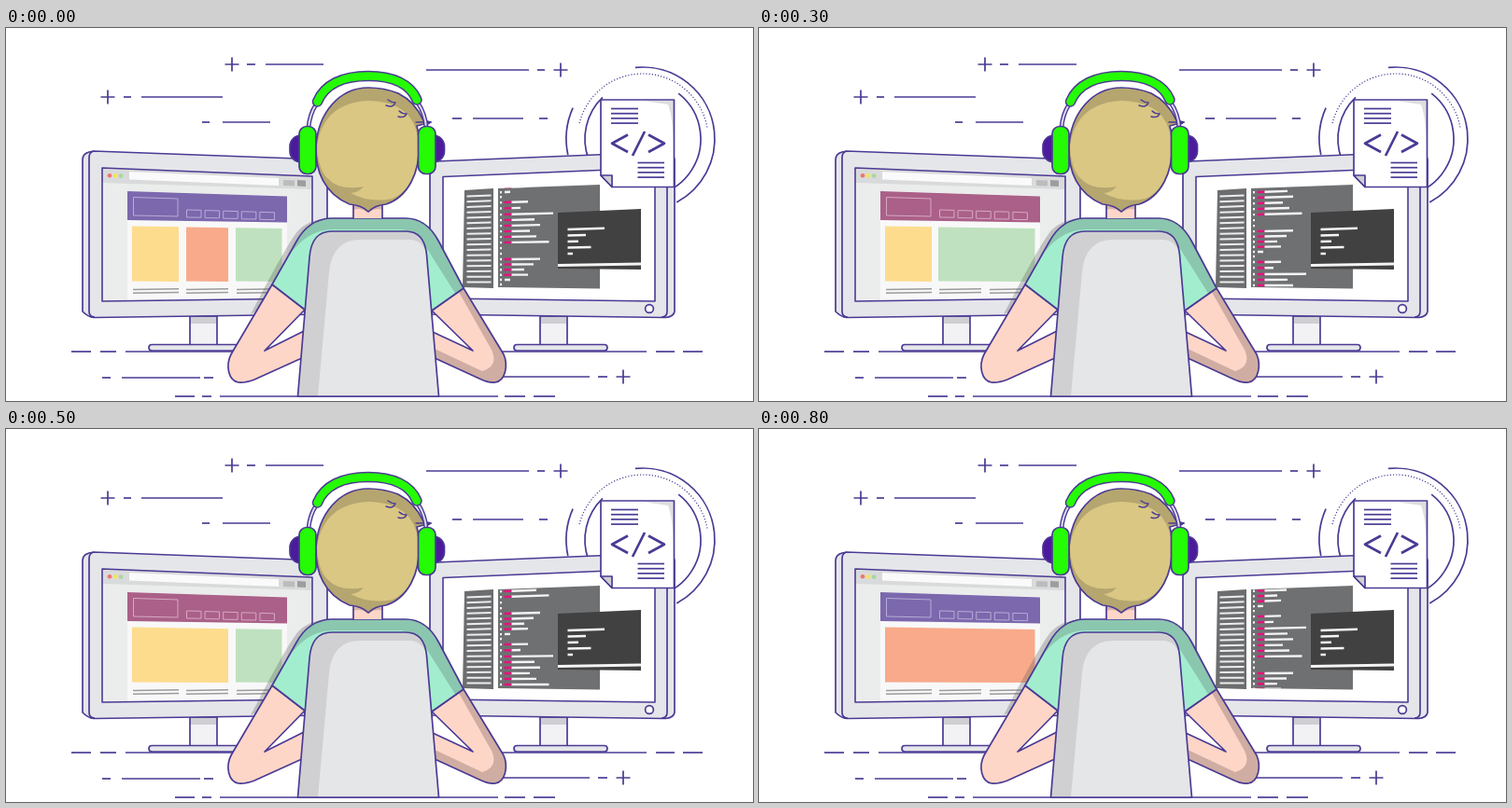
An HTML page with a canvas for the animation above (0.9 s loop, 800 by 400 pixels).

```html
<!DOCTYPE html>
<html lang="en">
<head>
<meta charset="utf-8">
<title>Developer at work</title>
<style>
html, body { margin: 0; width: 100%; height: 100%; overflow: hidden; background: #fff; }
canvas { display: block; width: 800px; height: 400px; }
</style>
</head>
<body>
<canvas id="stage"></canvas>
<script>
const canvas = document.getElementById('stage');
const ctx = canvas.getContext('2d');
const ratio = window.devicePixelRatio || 1;
canvas.width = 800 * ratio;
canvas.height = 400 * ratio;

const INK = '#4b3a94', CASE = '#e5e6ea', SHADE = '#d0d0d2', SKIN = '#fdd6c8';
const GREEN = '#25fb04', YELLOW = '#fddc8e', ORANGE = '#f8aa8a', MINT = '#bfe1bf';
const STEP = 100, STEPS = 9;

function path(d, fill, stroke, width = 1.7) {
  const p = new Path2D(d);
  if (fill) { ctx.fillStyle = fill; ctx.fill(p); }
  if (stroke) { ctx.strokeStyle = stroke; ctx.lineWidth = width; ctx.stroke(p); }
}

function quad(x1, y1, x2, y2, x3, y3, x4, y4, fill, stroke, width) {
  path(`M${x1} ${y1}L${x2} ${y2}L${x3} ${y3}L${x4} ${y4}Z`, fill, stroke, width);
}

function rounded(x, y, w, h, r, fill, stroke) {
  ctx.beginPath();
  ctx.roundRect(x, y, w, h, r);
  ctx.fillStyle = fill;
  ctx.fill();
  if (stroke) { ctx.strokeStyle = stroke; ctx.lineWidth = 1.7; ctx.stroke(); }
}

function disc(x, y, r, fill, stroke) {
  rounded(x - r, y - r, 2 * r, 2 * r, r, fill, stroke);
}

function dashes(y, ...xs) {
  for (let i = 0; i < xs.length; i += 2) path(`M${xs[i]} ${y}H${xs[i + 1]}`, null, INK);
}

function plus(x, y) {
  path(`M${x - 7.5} ${y}h15M${x} ${y - 7.5}v15`, null, INK);
}

function arc(r, from, to, dots) {
  const rad = Math.PI / 180;
  ctx.beginPath();
  ctx.arc(682, 119, r, from * rad, to * rad);
  ctx.strokeStyle = INK;
  ctx.lineWidth = dots ? 1.2 : 1.7;
  ctx.setLineDash(dots ? [1.2, 2] : []);
  ctx.stroke();
  ctx.setLineDash([]);
}

function backdrop() {
  plus(242, 39);
  dashes(39, 258, 267, 278, 340);
  plus(109, 74);
  dashes(74, 126, 134, 145, 232);
  dashes(101, 210, 218, 232, 283);
  dashes(45, 450, 560, 569, 577);
  plus(594, 45);
  dashes(97, 478, 488, 500, 554, 571, 580);
  dashes(347, 70, 91, 101, 118, 128, 262, 512, 686, 696, 716, 725, 746);
  dashes(375, 103, 112, 124, 208, 212, 222);
  dashes(374, 532, 625, 634, 644);
  plus(661, 374);
  dashes(395, 181, 202, 210, 220, 229, 527, 534, 556, 565, 588);
  arc(77, -96, 62);
  arc(82, 168, 204);
  arc(70, 194, 350, true);
  arc(62, 160, 226);
  arc(62, -52, 58);
}

function stand(x) {
  path(`M${x - 14} 309V341H${x + 15}V309Z`, '#f2f2f5', INK);
  quad(x - 13, 310, x + 14, 310, x + 14, 317, x - 13, 317, '#cfcfd3');
}

function stands() {
  stand(211);
  rounded(153, 339.5, 104, 6.5, 3.2, CASE, INK);
  stand(586);
  rounded(544, 339.5, 100, 6.5, 3.2, CASE, INK);
}

function monitors() {
  path('M82 141Q82 135 89 133L94 132L339 141Q344 142 344 147V307L94 310.500Q88 310 82 304Z', CASE, INK);
  path('M94 132Q89 133 89 139V304Q89 310 95 310', null, INK);
  path('M454 148Q454 143 460 143L704 133Q716 135 716 141V304Q715 310 706 310.500L454 307Z', CASE, INK);
  path('M703 133Q708 134 708 140V304Q708 310 702 310', null, INK);
  quad(103, 150, 328, 159, 328, 290, 103, 293, '#ebecec');
  quad(468, 159.500, 695, 150, 695, 293, 468, 290, '#fff', INK, 1.6);
  disc(689, 301, 4.4, '#fff', INK);
}

function layoutCards(step) {
  if (step < 3) return [[135, 185, YELLOW], [193, 238, ORANGE], [246, 295.5, MINT]];
  if (step < 5) return [[135, 185, YELLOW], [192, 295.5, MINT]];
  if (step < 7) return [[135, 238, YELLOW], [246, 295.5, MINT]];
  return [[135, 295.5, ORANGE]];
}

function browser(step) {
  quad(103, 150, 328, 159, 328, 173, 103, 166, '#d9dadb');
  ['#ea7670', '#f7e35c', '#a8d89a'].forEach((c, i) => disc(111 + i * 6, 158.2 + i * 0.2, 2.3, c));
  quad(132, 154, 292, 161, 292, 169, 132, 162.500, '#fafafa');
  quad(297, 163, 309, 163.500, 309, 169.500, 297, 169, '#bcbcbd');
  quad(312, 163, 321, 163.500, 321, 170, 312, 169.500, '#9d9d9f');
  quad(130, 175, 301, 180, 301, 290, 130, 292, '#f8f8f8');
  const mauve = step > 2 && step < 7;
  quad(130, 175, 301, 180.500, 301, 208.500, 130, 206, mauve ? '#aa6088' : '#7b68ad');
  const trim = mauve ? '#d8a9c4' : '#b9acd9';
  quad(136.500, 181.500, 184, 183, 184, 202, 136.500, 201, null, trim, 1);
  for (let i = 0; i < 5; i++) {
    const x = 193.5 + i * 19.6, y = 195 + i * 0.6;
    quad(x, y, x + 15.5, y + 0.4, x + 15.5, y + 8.2, x, y + 8, null, trim, 1);
  }
  for (const [a, b, color] of layoutCards(step)) {
    const top = x => 212.5 + (x - 135) * 0.016;
    quad(a, top(a), b, top(b), b, 272, a, 271.500, color);
  }
  for (const [a, b] of [[136, 185], [193, 238], [247, 295]]) {
    path(`M${a} 280.500L${b} 279.800M${a} 284.200L${b} 283.500`, null, '#9b9b9b', 1.6);
  }
  quad(103, 150, 328, 159, 328, 290, 103, 293, null, INK, 1.6);
}

// Offset within the repeating listing, right end of the text
const LISTING = [
  [0, 572], [5.6, 565], [11.2, 555], [16.7, 559], [22, 540], [27, 0],
  [33, 559], [39.3, 551], [46, 586], [52, 566], [58, 572],
  [64, 561], [70, 568], [76, 581.5], [82, 0], [88, 0]
];

function codeRow(y, end) {
  const tilt = -0.037 * (278 - y) / 106;
  const bar = (a, b, color) =>
    path(`M${a} ${y + (a - 535) * tilt}L${b} ${y + (b - 535) * tilt}`, null, color, 2.4);
  bar(529, 531, '#f4f4f4');
  if (!end) return;
  if (end < 545) return bar(534, end, '#f4f4f4');
  bar(533.5, 541.5, '#e5127d');
  bar(541.5, end, '#f4f4f4');
}

function editor(step) {
  quad(491, 174, 522, 172, 522, 279, 489, 278, '#6c6d6f');
  for (let i = 0; i < 17; i++) {
    const y = 180.5 + i * 5.75;
    path(`M493.500 ${y}L519.500 ${y - 1 + i * 0.06}`, null, '#ededed', 2);
  }
  const panel = 'M527 172L636 168V279.500L527 278Z';
  path(panel, '#6f7072');
  ctx.save();
  ctx.clip(new Path2D(panel));
  const base = 248 - step * 10;
  for (let turn = -1; turn < 3; turn++) {
    for (const [dy, end] of LISTING) {
      const y = base + turn * 94 + dy;
      if (y > 168 && y < 282) codeRow(y, end);
    }
  }
  ctx.restore();
}

function consoleRows(step) {
  if (step === 1 || step === 2) return [641, 614, 622, 605, 607];
  if (step === 6 || step === 7) return [614, 632, 605, 626.5, 607];
  return [641, 621, 613, 626.5, 607];
}

function terminal(step) {
  quad(591, 198, 680, 194, 680, 259, 591, 258, '#414142');
  quad(591, 253, 680, 251.500, 680, 254.500, 591, 256, '#f3f3f3');
  consoleRows(step).forEach((end, i) => {
    const y = 216 + i * 6.5;
    path(`M601.500 ${y}L${end} ${y - (end - 601) * (0.034 - i * 0.006)}`, null, '#f4f4f4', 2.5);
  });
}

function paper() {
  path('M637 77H715.500V170.500H649L637 158Z', '#fff');
  path('M682 78H715V124Q714 95 709 82Z', '#dedee0');
  path('M637 77H715.500V170.500H649L637 158Z', null, INK);
  path('M637 158H649V170.500Z', SHADE, INK);
  for (let i = 0; i < 4; i++) {
    dashes(86.5 + i * 5.2, 648, 677);
    dashes(144.5 + i * 5.2, 676.5, 705);
  }
  path('M666 114.500L649 123.700L666 133M688 114.500L705 123.700L688 133M684 111L671 137', null, INK, 2.7);
}

function body() {
  // soft shadow beside the left arm
  path('M346 204Q325 205 313 217Q300 233 262 307L270 303L285 275L312 227Q324 206 346 204Z', 'rgba(90,90,90,.3)');
  const leftArm = 'M285 275L241 350C235 362 238 378 249 380Q255 381 266 377L319 353V325L277 346L320 302Z';
  const rightArm = 'M490 279L533 350C538 362 535 378 524 380Q517 381 507 376L457 353V326L500 346L456 303Z';
  path(leftArm, SKIN);
  path(rightArm, SKIN);
  ctx.save();
  ctx.clip(new Path2D(rightArm));
  path('M482 278L520 345Q528 362 510 368L457 343V360L520 390L545 375L540 340L492 270Z', 'rgba(70,50,50,.25)');
  ctx.restore();
  path(leftArm, null, INK);
  path(rightArm, null, INK);

  const shirt = 'M320 302L285 275L311 229Q324 205 348 204H428Q450 204 463 228L490 279L456 303V330H320Z';
  path(shirt, '#a3edcf');
  ctx.save();
  ctx.clip(new Path2D(shirt));
  path('M311 229Q324 204 348 204H428Q450 204 463 228L492 282L482 286L448 232Q440 217 422 216H350Q325 216 306 240Z', 'rgba(70,80,80,.25)');
  ctx.restore();
  path(shirt, null, INK);

  const chair = 'M312.500 395L325 246Q327 218 349 218H428Q448 218 450.500 243L463.500 395Z';
  path(chair, SHADE);
  path('M334 395L346 262Q349 228 378 227H434Q449 229 451 247L463 395Z', '#e5e6e8');
  path(chair, null, INK);
}

function head() {
  path('M372 184V204H403V184Z', SKIN);
  path('M372 184V195Q380 192 388 198Q396 192 403 195V184Z', 'rgba(90,70,70,.25)');
  path('M372 188V204M403 188V204', null, INK);
  const hair = 'M388 64C357 64 334 91 332 127C331 153 341 178 368 189Q381 190 388 197Q395 190 407 189C431 181 443 154 442 128Q443 116 440 105L455 101L447 99Q438 79 420 70Q405 64 388 64Z';
  path(hair, '#b5a56f');
  path('M333 126C338 94 358 79 389 78Q419 79 432 95Q442 108 442 130C442 153 433 175 414 183Q389 188 369 177Q377 177 383 170Q357 175 344 161Q334 151 333 126Z', '#d9c783');
  path(hair, null, INK);
  path('M407 83Q415 86 417 80Q413 80 409 77M420 95Q427 97 429 92Q424 92 421 89M439 101L455 101L445 108', null, INK, 1.4);
}

function headphones() {
  for (const [color, width] of [[INK, 4.8], ['#dfdcef', 2]]) {
    path('M332 82Q325 93 324 107M441 80Q449 92 450 107', null, color, width);
  }
  const band = 'M333.500 79C341 61 360 51.500 388 51.500C414 51.500 433 60 440 77';
  path(band, null, INK, 11.5);
  path(band, null, GREEN, 8.5);
  rounded(304, 115, 18, 29, [12, 0, 0, 12], '#4c1a9c', INK);
  rounded(452, 115, 17.5, 29, [0, 12, 12, 0], '#4c1a9c', INK);
  rounded(314, 105.5, 18, 51, 8, GREEN, INK);
  rounded(441.5, 105.5, 18.5, 51, 8, GREEN, INK);
}

function render(now) {
  const step = Math.floor(now / STEP) % STEPS;
  ctx.setTransform(ratio, 0, 0, ratio, 0, 0);
  ctx.fillStyle = '#fff';
  ctx.fillRect(0, 0, 800, 400);
  ctx.lineJoin = 'round';
  ctx.lineCap = 'butt';
  backdrop();
  stands();
  monitors();
  browser(step);
  editor(step);
  terminal(step);
  paper();
  ctx.lineCap = 'round';
  body();
  head();
  headphones();
}

let start;
function tick(now) {
  if (start === undefined) start = now;
  render(now - start);
  requestAnimationFrame(tick);
}
render(0);
requestAnimationFrame(tick);
</script>
</body>
</html>
```
